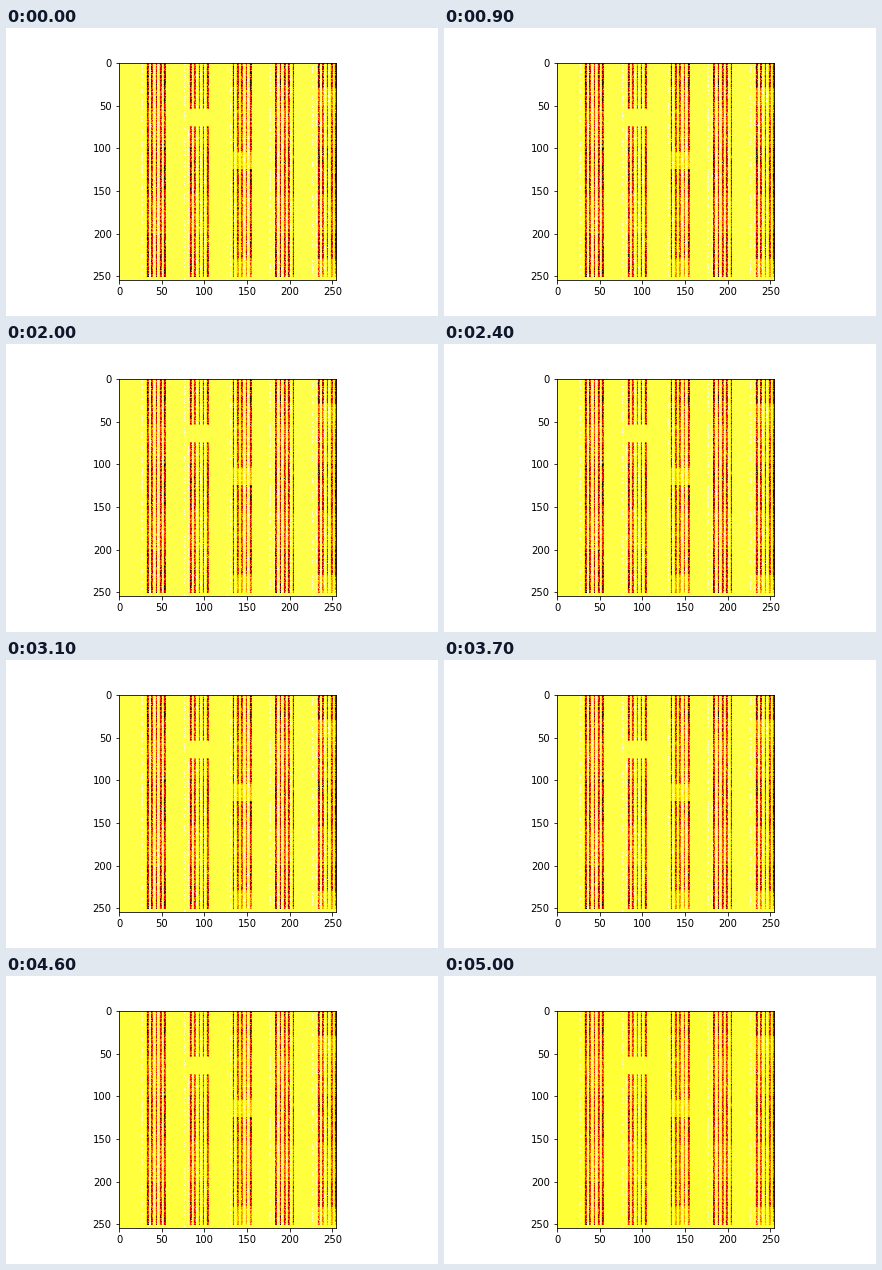
Recreate the animation shown at these times as a matplotlib script. Size 432x288 px, loop 5100 ms.

```python
import numpy as np
import matplotlib.pyplot as plt
from matplotlib.animation import FuncAnimation

TILE, TILES = 5, 51
SIZE = TILE * TILES
BANDS, BLOCKS = 5, 10
FRAMES, STEP_MS = 51, 100

rng = np.random.default_rng(7)


def block_levels():
    """Darkness per band and block: a shared wave with a few pale blocks."""
    band, block = np.mgrid[:BANDS, :BLOCKS]
    wave = .09 * np.cos(2 * np.pi * block / 4.4)
    levels = .52 + wave - .05 * (band == 1)
    pale = {(1, 2): 0, (2, 4): .2, (2, 9): .3, (4, 1): .3, (4, 9): .28}
    for place, level in pale.items():
        levels[place] = level
    return levels


def build_maps():
    row, col = np.mgrid[:SIZE, :SIZE]
    row_tile, col_tile = row // TILE, col // TILE
    offset = col % TILE
    band = np.clip((col_tile - 5) // 10, 0, BANDS - 1)
    stripe = (col_tile - 6) % 10
    in_band = (stripe < 5) & (col_tile > 5)

    # Tiles on a border belong to both blocks; the stronger one wins.
    levels = block_levels()
    above = np.clip((row_tile - 1) // 5, 0, BLOCKS - 1)
    below = np.clip(row_tile // 5, 0, BLOCKS - 1)
    level = np.maximum(levels[band, above], levels[band, below])
    level = level * in_band * (row < SIZE - 3)

    across = np.array([0, 0, .18, 1, .8])[offset]
    down = 1 - .3 * (row % TILE == 4) + .1 * np.sin(2.5 * row)
    weight = 1.05 - .2 * np.sin(np.pi * stripe / 4)
    grain = 1 + .25 * rng.normal(size=level.shape)
    dark = level * across * down * weight * grain

    # Pale dots: a dotted lead-in tile, then the gaps between stripes.
    dots = rng.random(level.shape)
    lead = (stripe == 9) & ((offset == 1) | (offset == 2)) & (dots < .4)
    gap = (level > 0) & (offset < 2) & (dots < .6)
    light = .12 * lead + .15 * gap * rng.random(level.shape)
    return dark, light


dark, light = build_maps()


def field(i):
    t = i / (FRAMES - 1)
    noise = np.random.default_rng(100 + i).normal(size=dark.shape)
    base = np.interp(i, [0, 9, 15, 24, 43, 50],
                     [.817, .817, .823, .816, .814, .797])
    fade = 1 - .05 * t - .12 * t ** 6
    return np.clip(base + fade * (light - dark * (1 + .06 * noise)), 0, 1)


fig = plt.figure(figsize=(6, 4), dpi=72, facecolor="white")
fig.subplots_adjust(left=.125, right=.9, bottom=.125, top=.88)
ax = fig.add_subplot()
image = ax.imshow(field(0), cmap="hot", vmin=0, vmax=1, interpolation="nearest")
ax.set_xticks(range(0, SIZE, 50))
ax.set_yticks(range(0, SIZE, 50))


def update(i):
    image.set_data(field(i))
    return [image]


anim = FuncAnimation(fig, update, frames=FRAMES, interval=STEP_MS,
                     repeat=True, repeat_delay=0)
plt.show()
```
